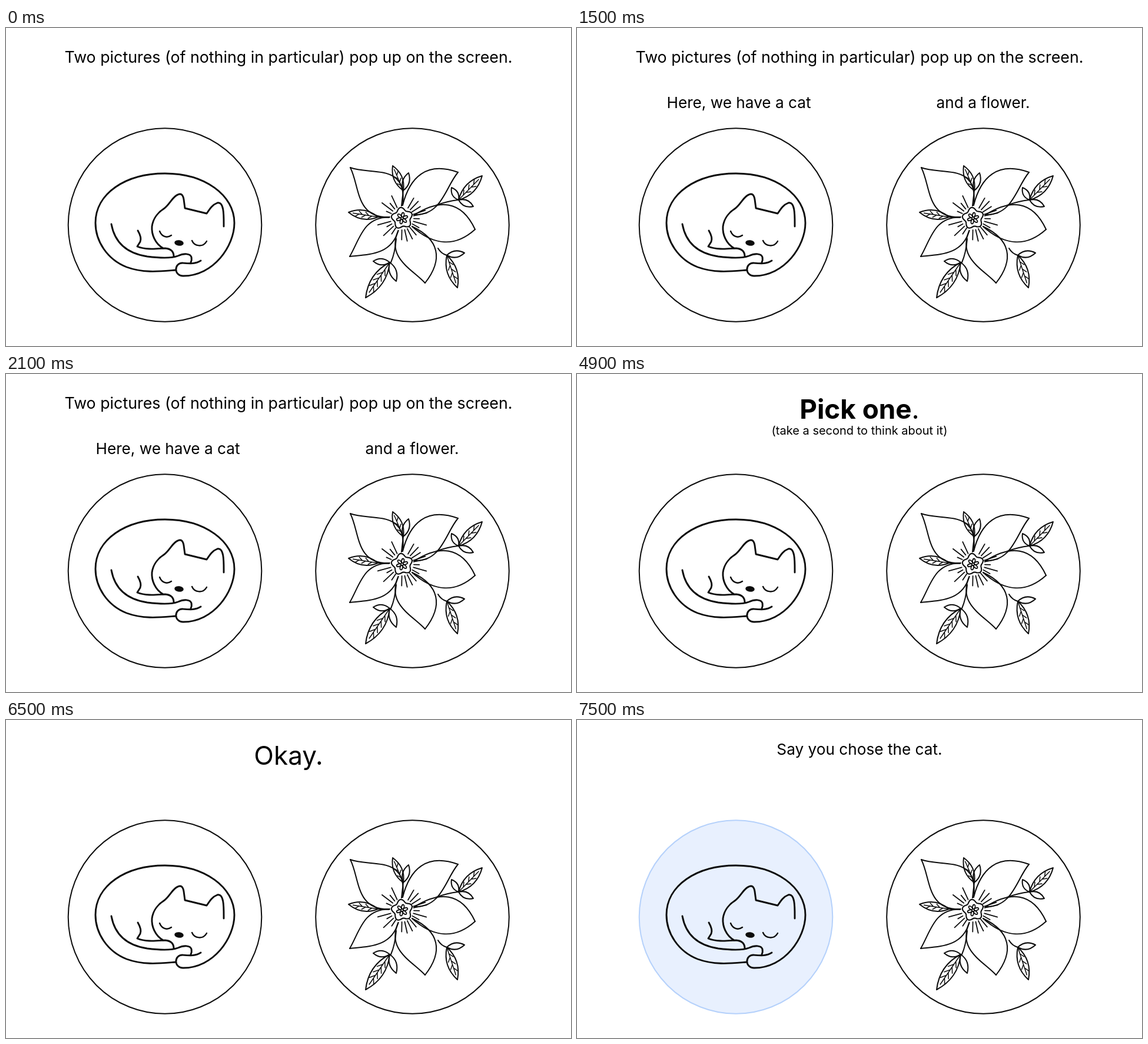
These frames come from a looping animation (960 by 540 pixels, 8 s). An HTML page with a canvas:

```html
<!DOCTYPE html>
<html lang="en">
<head>
<meta charset="utf-8">
<title>Pick one</title>
<style>
  html, body { margin: 0; width: 100%; height: 100%; overflow: hidden; background: #fff; }
  canvas { display: block; width: 960px; height: 540px; }
</style>
</head>
<body>
<canvas id="stage" width="960" height="540"></canvas>
<script>
const ctx = document.getElementById('stage').getContext('2d');
const LOOP = 8000;
const TAU = Math.PI * 2;
const INK = '#0c0c0c';
const FONT = 'Inter, Montserrat, "Open Sans", sans-serif';
const HUB = { x: 673, y: 323 };

// Tip, bulge of the two edges, and how blunt each edge is near the tip
const petals = [
  { x: 585, y: 237, bulge: [46, 64], blunt: [0.15, 0.15] },
  { x: 768, y: 245, bulge: [35, 33], blunt: [1.25, 0.1] },
  { x: 797, y: 342, bulge: [35, 28], blunt: [1.25, 1.25] },
  { x: 712, y: 433, bulge: [40, 39], blunt: [1, 0.25] },
  { x: 584, y: 388, bulge: [31, 32], blunt: [0.4, 0.25] }
];
for (const p of petals) p.angle = Math.atan2(p.y - HUB.y, p.x - HUB.x);

// Where the leaves join, and their tips
const sprigs = [
  { at: [675, 276], tips: [[657, 234], [684, 246]] },
  { at: [632, 321], tips: [[582, 313]] },
  { at: [769, 292], tips: [[809, 251], [757, 271], [794, 303]] },
  { at: [652, 398], tips: [[611, 458], [624, 396], [663, 430]] },
  { at: [749, 386], tips: [[779, 382], [767, 441]] }
];

function stroke(d, width, color = INK) {
  ctx.lineWidth = width;
  ctx.strokeStyle = color;
  ctx.stroke(new Path2D(d));
}

// Curve between two points, pushed sideways by h near its start and k near its end
function edge(x0, y0, x1, y1, h, k) {
  const dx = x1 - x0, dy = y1 - y0, len = Math.hypot(dx, dy);
  const at = (u, off) => `${x0 + dx * u - dy / len * off} ${y0 + dy * u + dx / len * off}`;
  return `M${at(0, 0)}C${at(0.32, h)} ${at(0.67, k)} ${at(1, 0)}`;
}

function ring(x, fill, color) {
  ctx.beginPath();
  ctx.arc(x, 334.5, 164.3, 0, TAU);
  ctx.fillStyle = fill;
  ctx.fill();
  ctx.lineWidth = 2;
  ctx.strokeStyle = color;
  ctx.stroke();
}

function drawCat() {
  // Body, hind leg, front paw, head, eyes
  stroke('M289 411C264 413 235 417 205 406C172 393 152 362 152 331C152 281 203 247 270 247C338 247 388 284 388 331C388 370 353 421 301 421C285 421 285 399 300 399C312 400 322 401 331 395', 2.9);
  stroke('M179 333C185 366 207 383 240 388C264 391 282 391 292 387C303 382 313 383 315 389Q316 394 314 398', 2.9);
  stroke('M224 344Q231 356 228 363L223 371C238 377 254 375 270 374Q285 375 285 388', 2.9);
  stroke('M267 374C253 366 247 350 248 337C250 322 260 312 268 307C278 300 283 286 292 283Q300 279 302 291L304 306L341 315C347 306 351 300 359 297C371 294 370 320 370 337', 2.9);
  stroke('M261 345C265 355 274 357 281 352M316 361C320 371 335 373 341 362', 2.4);
  ctx.beginPath();
  ctx.ellipse(294, 365, 7.8, 4.8, 0.12, 0, TAU);
  ctx.fillStyle = INK;
  ctx.fill();
}

function drawLeaf(x, y, tx, ty) {
  const dx = tx - x, dy = ty - y, len = Math.hypot(dx, dy);
  const h = 3.3 + len * 0.127;
  stroke(edge(x, y, tx, ty, h, h) + edge(x, y, tx, ty, -h, -h), 2);
  if (len < 38) return;

  // Midrib with veins on alternate sides
  const at = (u, off) => `${x + dx * u - dy / len * off} ${y + dy * u + dx / len * off}`;
  let d = `M${at(0, 0)}L${at(0.85, 0)}`;
  const count = Math.round(len / 11);
  for (let i = 0; i < count; i++) {
    const u = 0.2 + 0.55 * i / count;
    d += `M${at(u, 0)}L${at(u + 0.12, (i % 2 ? 1 : -1) * h * 0.5)}`;
  }
  stroke(d, 1.5);
}

function drawPetals() {
  // Neighbouring petals meet midway between their tips
  const valleys = petals.map((p, i) => {
    const prev = petals[(i + 4) % 5].angle;
    const gap = (p.angle - prev + TAU) % TAU;
    const a = p.angle - gap / 2;
    return [HUB.x + 22 * Math.cos(a), HUB.y + 22 * Math.sin(a)];
  });
  petals.forEach(({ x, y, bulge: [a, b], blunt: [ka, kb] }, i) => {
    stroke(edge(...valleys[i], x, y, -a, -a * ka), 2);
    stroke(edge(...valleys[(i + 1) % 5], x, y, b, b * kb), 2);
  });
}

function drawHeart() {
  ctx.save();
  ctx.translate(HUB.x, HUB.y);

  // A fan of stamens toward each petal
  let rays = '';
  petals.forEach((p, i) => {
    for (let j = 0; j < 4; j++) {
      const a = p.angle + (j - 1.5) * 0.24;
      const r = 29 + 14 * Math.abs(Math.sin(i * 2.3 + j * 1.7));
      const c = Math.cos(a), s = Math.sin(a);
      rays += `M${20 * c} ${20 * s}L${r * c} ${r * s}`;
    }
  });
  stroke(rays, 1.8);

  ctx.beginPath();
  for (let i = 0; i <= 100; i++) {
    const a = i / 100 * TAU;
    const r = 16 + 2.3 * Math.cos(5 * (a + 0.45));
    ctx.lineTo(r * Math.cos(a), r * Math.sin(a));
  }
  ctx.fillStyle = '#fff';
  ctx.fill();
  ctx.lineWidth = 2.1;
  ctx.stroke();

  ctx.lineWidth = 1.8;
  for (let i = 0; i < 6; i++) {
    const a = -1.35 + i * TAU / 6;
    ctx.beginPath();
    ctx.ellipse(5.8 * Math.cos(a), 5.8 * Math.sin(a), 3.9, 2.2, a, 0, TAU);
    ctx.stroke();
  }
  ctx.restore();
}

function drawFlower() {
  drawPetals();
  stroke('M731 301Q750 294 768 292M663 358Q661 382 654 398M734 374Q739 383 749 386M632 321L652 321M675 276L672 302', 2);
  for (const { at, tips } of sprigs) {
    for (const tip of tips) drawLeaf(...at, ...tip);
  }
  drawHeart();
}

// Draws [text, weight] runs as one centred line
function line(x, y, size, ...runs) {
  const font = weight => `${weight} ${size}px ${FONT}`;
  const widths = runs.map(([text, weight]) => {
    ctx.font = font(weight);
    return ctx.measureText(text).width;
  });
  let left = x - widths.reduce((a, b) => a + b) / 2;
  ctx.fillStyle = '#000';
  runs.forEach(([text, weight], i) => {
    ctx.font = font(weight);
    ctx.fillText(text, left, y);
    left += widths[i];
  });
}

function drawText(t) {
  if (t < 2500) {
    line(480, 58.5, 26.8, ['Two pictures (of nothing in particular) pop up on the screen.', 400]);
    if (t >= 500) line(275, 136, 26.2, ['Here, we have a cat', 400]);
    if (t >= 1500) line(690, 136, 26.2, ['and a flower.', 400]);
  } else if (t < 6500) {
    line(480, 75.5, 45.8, ['Pick one', 700], ['.', 400]);
    line(480, 103, 20, ['(take a second to think about it)', 400]);
  } else if (t < 7500) {
    line(480, 75.5, 44, ['Okay.', 400]);
  } else {
    line(480, 58.5, 26.2, ['Say you chose the cat.', 400]);
  }
}

function frame() {
  const t = performance.now() % LOOP;
  const chosen = t >= 7500;
  ctx.fillStyle = '#fff';
  ctx.fillRect(0, 0, 960, 540);
  ctx.lineCap = ctx.lineJoin = 'round';
  ring(270, chosen ? '#e8f0fe' : '#fff', chosen ? '#b5d1fb' : INK);
  ring(690.5, '#fff', INK);
  drawCat();
  drawFlower();
  drawText(t);
  requestAnimationFrame(frame);
}
frame();
</script>
</body>
</html>
```
